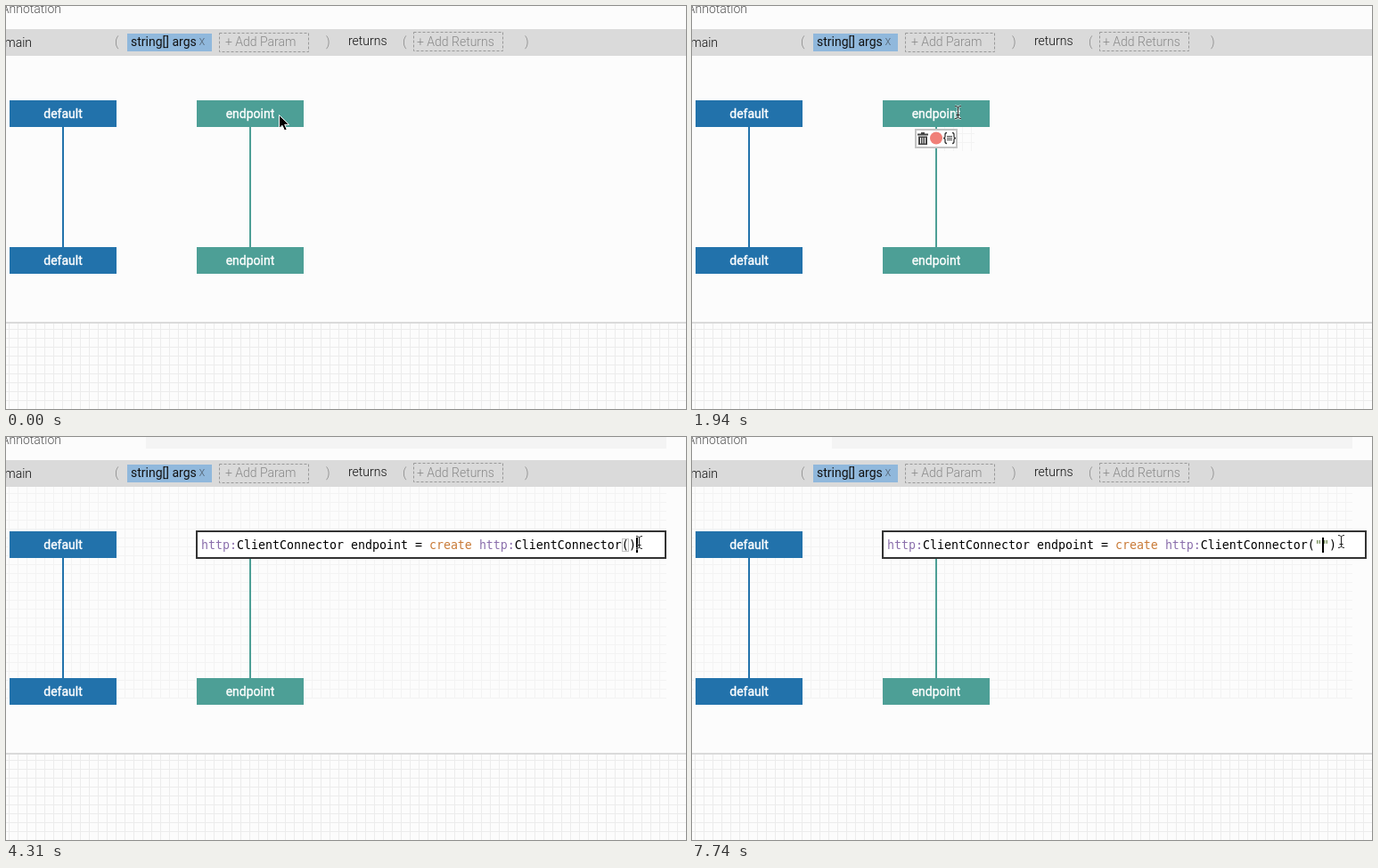
An HTML page for the animation above (8 s loop, 763 by 453 pixels).

```html
<!DOCTYPE html>
<html lang="en">
<head>
<meta charset="utf-8">
<title>Endpoint editor</title>
<style>
  html, body { margin: 0; width: 100%; height: 100%; overflow: hidden; background: #fcfcfc; }
  svg { display: block; width: 763px; height: 453px; }
  text { font: 300 14px Roboto, sans-serif; fill: #111; white-space: pre; }
  .muted { fill: #888; }
  .chip { font-weight: 400; }
  .label { font-weight: 400; fill: #fff; stroke: #fff; stroke-width: .35px; text-anchor: middle; }
  .end { text-anchor: end; }
  .dashed { fill: none; stroke: #999; stroke-dasharray: 3 2; }
  .code { font: 13.29px "DejaVu Sans Mono", monospace; fill: #000; }
  .type { fill: #8b6fac; }
  .keyword { fill: #c97b38; }
  .string { fill: #5d7a3c; }
  .frame { fill: #fff; stroke: #333; stroke-width: 2px; }
  .match { fill: none; stroke: #c4c4c4; }

  .editing, .first, .typed, .tools, .open, .close, .caret, .caret-x, .pointer, .arrow, .beam, .trail {
    animation: 8s step-end infinite;
  }
  .editing { animation-name: editing; }
  .first { animation-name: first; }
  .typed { animation-name: typed; }
  .tools { animation-name: tools; }
  .open { animation-name: open; }
  .close { animation-name: close; }
  .caret { animation-name: caret; }
  .caret-x { animation-name: caret-x; }
  .pointer { animation-name: pointer; }
  .arrow { animation-name: arrow; }
  .beam { animation-name: beam; }
  .trail { animation-name: trail; }

  @keyframes editing { 0% { opacity: 0 } 37.375%, 100% { opacity: 1 } }
  @keyframes first { 0% { opacity: 1 } 96.75%, 100% { opacity: 0 } }
  @keyframes typed { 0% { opacity: 0 } 96.75%, 100% { opacity: 1 } }
  @keyframes trail { 0% { opacity: 0 } 1.75%, 100% { opacity: 1 } }
  @keyframes open { 0% { opacity: 1 } 61.375%, 100% { opacity: 0 } }
  @keyframes close { 0% { opacity: 0 } 61.375% { opacity: 1 } 96.75%, 100% { opacity: 0 } }
  @keyframes tools {
    0% { opacity: 0 } 20.5% { opacity: .5 } 22.375% { opacity: .9 } 24.25% { opacity: 1 }
    44.875% { opacity: .9 } 46.625% { opacity: .7 } 48.375% { opacity: .3 } 50.25%, 100% { opacity: 0 }
  }
  @keyframes caret {
    0% { opacity: 1 } 44.875% { opacity: 0 } 52% { opacity: 1 } 57.625% { opacity: 0 }
    61.375% { opacity: 1 } 67% { opacity: 0 } 72.625% { opacity: 1 } 80% { opacity: 0 }
    85.625% { opacity: 1 } 93.125% { opacity: 0 } 96.75%, 100% { opacity: 1 }
  }
  @keyframes caret-x {
    0% { transform: translateX(707px) } 61.375% { transform: translateX(699px) }
    96.75%, 100% { transform: translateX(707px) }
  }
  @keyframes pointer {
    0% { transform: translate(306px, 122px) }
    1.75% { transform: translate(302px, 128px) }
    3.625% { transform: translate(291px, 140px) }
    5.5% { transform: translate(285px, 144px) }
    7.375% { transform: translate(284px, 144px) }
    20.5% { transform: translate(287px, 139px) }
    22.375% { transform: translate(294px, 126px) }
    24.25% { transform: translate(298px, 119px) }
    43% { transform: translate(350px, 117px) }
    44.875% { transform: translate(492px, 111px) }
    46.625% { transform: translate(604px, 111px) }
    48.375% { transform: translate(660px, 112px) }
    50.25% { transform: translate(690px, 114px) }
    52% { transform: translate(705px, 118px) }
    53.875% { transform: translate(710px, 118px) }
    55.75% { transform: translate(712px, 118px) }
    65.125% { transform: translate(722px, 117px) }
    67%, 100% { transform: translate(728px, 117px) }
  }
  @keyframes arrow { 0% { opacity: 1 } 24.25% { opacity: 0 } 44.875% { opacity: 1 } 52%, 100% { opacity: 0 } }
  @keyframes beam { 0% { opacity: 0 } 24.25% { opacity: 1 } 44.875% { opacity: 0 } 52%, 100% { opacity: 1 } }
</style>
</head>
<body>
<svg viewBox="0 0 763 453">
  <defs>
    <pattern id="grid" width="10" height="10" patternUnits="userSpaceOnUse">
      <path d="M3.5 0V10M0 3.5H10" stroke="#ececec"/>
    </pattern>
    <pattern id="faint" width="10" height="10" patternUnits="userSpaceOnUse">
      <path d="M3.5 0V10M0 3.5H10" stroke="#f3f3f3"/>
    </pattern>
  </defs>

  <rect width="763" height="453" fill="#fcfcfc"/>
  <rect y="357" width="763" height="96" fill="url(#grid)"/>
  <rect y="355" width="763" height="2" fill="#dadada"/>
  <rect class="trail" x="282" y="136" width="35" height="27" fill="url(#faint)"/>
  <g class="editing">
    <rect x="157" width="584" height="13" fill="#f4f4f4"/>
    <rect y="56" width="741" height="238" fill="url(#faint)"/>
  </g>

  <text class="end" x="62" y="8" style="fill:#555">Annotation</text>
  <rect y="26" width="763" height="30" fill="#dadada"/>
  <text class="end" x="29" y="46">main</text>
  <text class="muted" x="122" y="45">(</text>
  <rect x="136" y="31" width="95" height="20" fill="#90b8dc"/>
  <text x="140" y="45" class="chip">string[] args</text>
  <text x="216.500" y="44" style="fill:#567">x</text>
  <rect class="dashed" x="239.500" y="30.500" width="100" height="21"/>
  <text class="muted" x="246" y="45">+ Add Param</text>
  <text class="muted" x="359" y="45">)</text>
  <text x="384" y="44">returns</text>
  <text class="muted" x="445" y="45">(</text>
  <rect class="dashed" x="457.500" y="29.500" width="100" height="21"/>
  <text class="muted" x="461" y="45">+ Add Returns</text>
  <text class="muted" x="582" y="45">)</text>

  <g fill="#2272ab">
    <path d="M4 106h120v30H65v135h59v30H4v-30h59V136H4z"/>
    <text class="label" x="64" y="126">default</text>
    <text class="label" x="64" y="291">default</text>
  </g>
  <g fill="#4d9f96">
    <path d="M214 106h120v30H275v135h59v30H214v-30h59V136h-59z"/>
    <text class="label" x="274" y="126">endpoint</text>
    <text class="label" x="274" y="291">endpoint</text>
  </g>

  <g class="tools">
    <rect x="251" y="139" width="46" height="20" fill="#fff" stroke="#c4c4c4" stroke-width="2"/>
    <path d="M257 142h4v1.500h4v2h-12v-2h4z" fill="#444"/>
    <path d="M254 146.500h10V156h-10zM256.500 148v6.500M259 148v6.500M261.500 148v6.500" fill="#444"/>
    <path d="M256.500 148v6.500M259 148v6.500M261.500 148v6.500" stroke="#fff"/>
    <circle cx="274" cy="148.500" r="7" fill="#f08078"/>
    <path d="M286 142.500q-2 0-2 2v2.500q0 1.500-2 1.500q2 0 2 1.500v2.500q0 2 2 2M292 142.500q2 0 2 2v2.500q0 1.500 2 1.500q-2 0-2 1.500v2.500q0 2-2 2"
      fill="none" stroke="#333" stroke-width="1.300"/>
    <path d="M286 146.500h6M286 148.500h6M286 150.500h6" stroke="#444"/>
  </g>

  <g class="editing">
    <rect class="frame first" x="214" y="106" width="526" height="30"/>
    <rect class="frame typed" x="214" y="106" width="542" height="30"/>
    <text class="code" x="219" y="126"><tspan class="type">http:</tspan>ClientConnector endpoint = <tspan class="keyword">create</tspan> <tspan class="type">http:</tspan>ClientConnector(</text>
    <text class="code first" x="699" y="126">)</text>
    <text class="code typed" x="699" y="126"><tspan class="string">""</tspan>)</text>
    <rect class="match open" x="691.500" y="114.500" width="7" height="14"/>
    <rect class="match close" x="699.500" y="114.500" width="7" height="14"/>
    <g class="caret-x"><rect class="caret" y="113" width="2" height="17"/></g>
  </g>

  <g class="pointer">
    <path class="arrow" d="M.5 .5V15.500L4 12.300L6.500 18L9.200 16.800L6.700 11.300H11.500z" fill="#000" stroke="#fff"/>
    <g class="beam" fill="none">
      <path d="M-3-6.500Q0-6.500 .5-5Q1-6.500 4-6.500M.5-5V6M-3 7.500Q0 7.500 .5 6Q1 7.500 4 7.500M-1.500 3.500h4" stroke="#fff" stroke-width="2.500" opacity=".6"/>
      <path d="M-3-6.500Q0-6.500 .5-5Q1-6.500 4-6.500M.5-5V6M-3 7.500Q0 7.500 .5 6Q1 7.500 4 7.500M-1.500 3.500h4" stroke="#222"/>
    </g>
  </g>
</svg>
</body>
</html>
```
